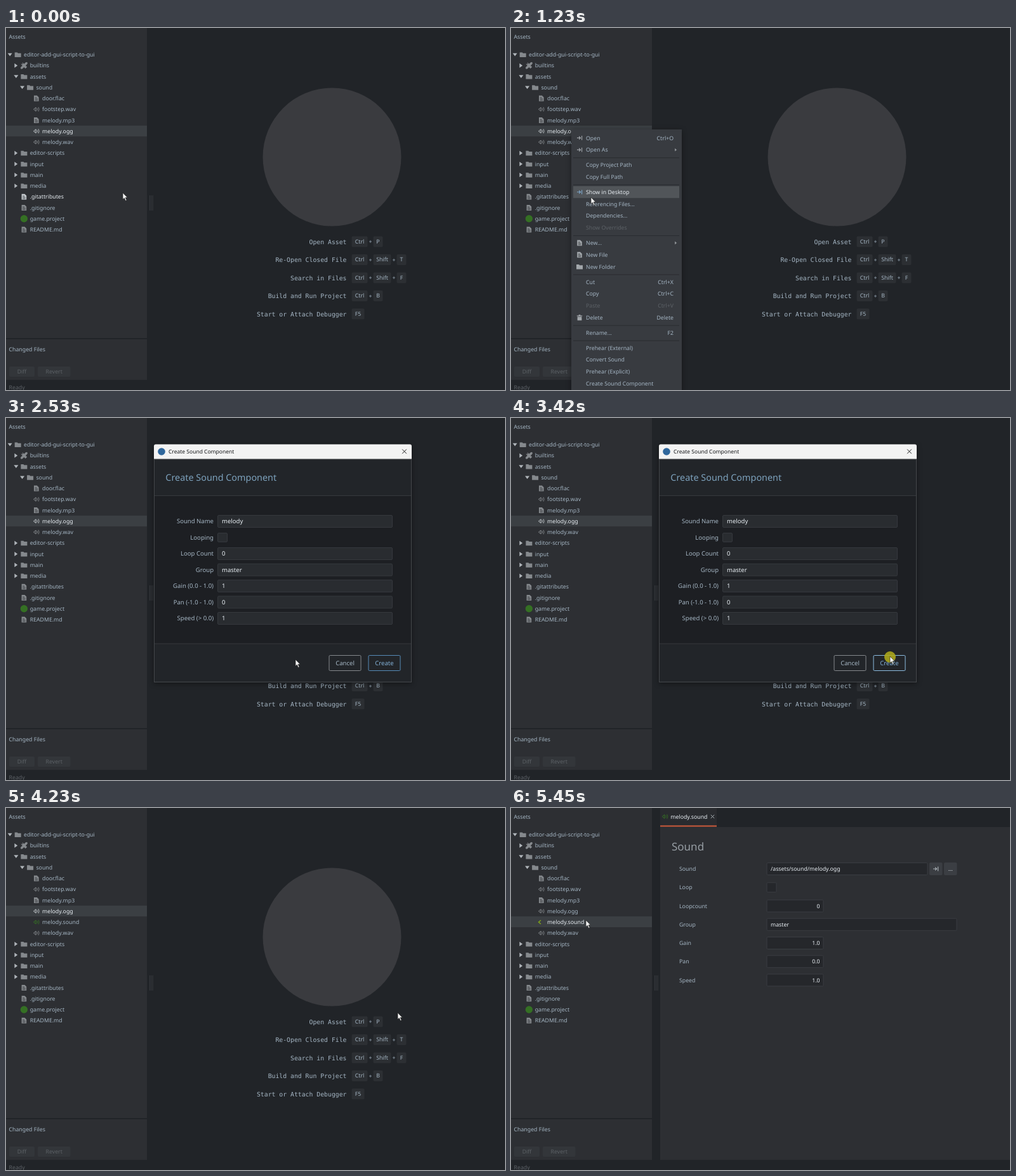
Animation of 786x571 px, one loop 6.25 s. Source, as an HTML page:

```html
<!DOCTYPE html>
<html lang="en">
<head>
<meta charset="utf-8">
<title>Create sound component</title>
<style>
  html, body { margin: 0; width: 100%; height: 100%; overflow: hidden; background: #212428; }
  svg { display: block; width: 100vw; height: 100vh; }
  text { font: 8.75px "Noto Sans", "Open Sans", sans-serif; fill: #a5b6c4; text-rendering: geometricPrecision; white-space: pre; }
  .mono { font: 9.8px "DejaVu Sans Mono", monospace; }
  .form { font-size: 9.55px; }
  .white { fill: #e9eff4; }
  .off { fill: #5c6166; }
  .end { text-anchor: end; }
  .mid { text-anchor: middle; }
  #menu, #dialog { filter: drop-shadow(0 2px 4px #0006); }
</style>
</head>
<body>
<svg id="stage" viewBox="0 0 786 571" preserveAspectRatio="none"></svg>
<script>
const LOOP = 6250, STEP = 68;
const GRAY = '#85898d', GREEN = '#357024', PANEL = '#2d2f33';

const text = (x, y, s, cls = '', style = '') =>
  `<text x="${x}" y="${y}" class="${cls}" style="${style}">${s}</text>`;
const rect = (x, y, w, h, fill, extra = '') =>
  `<rect x="${x}" y="${y}" width="${w}" height="${h}" fill="${fill}" ${extra}/>`;
const path = (d, fill, stroke = 'none', width = 1) =>
  `<path d="${d}" fill="${fill}" stroke="${stroke}" stroke-width="${width}"/>`;
const dot = (x, y, r, fill) => `<circle cx="${x}" cy="${y}" r="${r}" fill="${fill}"/>`;
const box = (x, cy, w, h, fill, stroke) =>
  rect(x + .5, cy - h / 2 + .5, w - 1, h - 1, fill, `stroke="${stroke}" rx="1.5"`);
const cross = (x, y, r, color) =>
  path(`M${x - r} ${y - r}l${2 * r} ${2 * r}m0 ${-2 * r}l${-2 * r} ${2 * r}`, 'none', color);

// Icons are drawn around their own centre.
const icons = {
  folder: c => path('M-5-3.6h4l1.2 1.4h4.8v6.2h-10z', c),
  file: c => path('M-3.8-4.6h4.8l2.8 2.8v6.4h-7.6z', c) +
    path('M-2.2-1.2h3M-2.2 .8h4.4M-2.2 2.8h4.4', 'none', PANEL, .8),
  sound: c => path('M-4.3 0l3.6-3v6z', 'none', c) +
    path('M1.2-2q1.4 2 0 4M3.2-3.4q2.2 3.4 0 6.8', 'none', c, .9),
  horn: c => path('M-.8-3L-4.2 0l3.4 3', 'none', c, 1.6),
  puzzle: c => path('M-3.5-3.5l7 7M3.5-3.5l-7 7', 'none', c, 3.8) +
    dot(-3.8, 3.8, 1.7, c) + dot(3.8, -3.8, 1.7, c) + dot(-3, -3, 1, PANEL),
  project: c => dot(0, 0, 5.7, c),
  goto: c => path('M-4 0h5.5M-.8-2.4l2.4 2.4l-2.4 2.4M3.6-3.4v6.8', 'none', c, 1.1),
  trash: c => path('M-4.2-3.2h8.4v1.2h-8.4zM-1.4-4.4h2.8v1.2h-2.8zM-3.4-1.2h6.8v5.8h-6.8z', c)
};
const icon = (name, x, y, color) => `<g transform="translate(${x} ${y})">${icons[name](color)}</g>`;

// --- Asset tree: depth, name, icon, arrow ---
const ROW = 17.25, TREE_TOP = 42 - ROW / 2;
const files = [
  [0, 'editor-add-gui-script-to-gui', 'folder', 'open'],
  [1, 'builtins', 'puzzle', 'shut'],
  [1, 'assets', 'folder', 'open'],
  [2, 'sound', 'folder', 'open'],
  [3, 'door.flac', 'file'],
  [3, 'footstep.wav', 'sound'],
  [3, 'melody.mp3', 'file'],
  [3, 'melody.ogg', 'sound'],
  [3, 'melody.sound', 'sound'],
  [3, 'melody.wav', 'sound'],
  [1, 'editor-scripts', 'folder', 'shut'],
  [1, 'input', 'folder', 'shut'],
  [1, 'main', 'folder', 'shut'],
  [1, 'media', 'folder', 'shut'],
  [1, '.gitattributes', 'file'],
  [1, '.gitignore', 'file'],
  [1, 'game.project', 'project'],
  [1, 'README.md', 'file']
];

function treeRows(hover, added, selected) {
  return files.filter(f => added || f[1] !== 'melody.sound').map(([depth, name, kind, arrow], i) => {
    const y = 42 + i * ROW, x = 18.7 + depth * 9.7, active = name === selected;
    let color = active || i === hover ? '#c3c8cc' : GRAY;
    if (kind === 'project') color = GREEN;
    if (name === 'melody.sound') {
      color = active ? '#7da01c' : GREEN;
      if (active) kind = 'horn';
    }
    const tri = arrow && path(arrow === 'open'
      ? `M${x - 16} ${y - 2.3}h7l-3.5 4.8z` : `M${x - 15} ${y - 3.5}v7l4.8-3.5z`, '#b0b5ba');
    return (active ? rect(0, Math.round(y - ROW / 2), 222, 17, '#3b3f43') : '') + (tri || '') +
      icon(kind, x, y, color) +
      text(x + 9.3, y + 3.1, name, active || i === hover ? 'white' : '');
  }).join('');
}

// --- Start screen ---
const shortcuts = [
  ['Open Asset', 'Ctrl', 'P'],
  ['Re-Open Closed File', 'Ctrl', 'Shift', 'T'],
  ['Search in Files', 'Ctrl', 'Shift', 'F'],
  ['Build and Run Project', 'Ctrl', 'B'],
  ['Start or Attach Debugger', 'F5']
];
const keyWidth = { Ctrl: 25, Shift: 28, F5: 20 };

function startScreen() {
  return dot(513.5, 203.5, 109, '#3a3b3f') + shortcuts.map(([label, ...keys], i) => {
    const y = 337 + i * 28.5;
    let x = 544.5, out = text(536.5, y + 3.6, label, 'mono end');
    keys.forEach((key, k) => {
      const w = keyWidth[key] || 15;
      if (k) out += text(x - 4.5, y + 3, '+', 'mid');
      out += rect(x, y - 8.5, w, 17, '#2c2f33', 'rx="2"') + text(x + w / 2, y + 2.9, key, 'mid');
      x += w + 9;
    });
    return out;
  }).join('');
}

// --- Context menu: label, shortcut, icon, disabled ---
const menuGroups = [
  [['Open', 'Ctrl+O', 'goto'], ['Open As', '>', 'goto']],
  [['Copy Project Path'], ['Copy Full Path']],
  [['Show in Desktop', '', 'goto'], ['Referencing Files...'], ['Dependencies...'], ['Show Overrides', '', '', true]],
  [['New...', '>', 'file'], ['New File', '', 'file'], ['New Folder', '', 'folder']],
  [['Cut', 'Ctrl+X'], ['Copy', 'Ctrl+C'], ['Paste', 'Ctrl+V', '', true], ['Delete', 'Delete', 'trash']],
  [['Rename...', 'F2']],
  [['Prehear (External)'], ['Convert Sound'], ['Prehear (Explicit)'], ['Create Sound Component']]
];
const ITEM = 18.75;
const menuItems = [], menuLines = [];
let nextY = 173.4;
for (const group of menuGroups) {
  for (const [label, keys, kind, off] of group) {
    menuItems.push({ y: nextY, label, keys, kind, off });
    nextY += ITEM;
  }
  menuLines.push(nextY - 6.7);
  nextY += 5.2;
}
menuLines.pop();

function menuRows(hover) {
  return rect(95, 160, 174, 420, '#383b40') +
    menuLines.map(y => rect(98, y, 167, 1, '#2a2c30')).join('') +
    menuItems.map(({ y, label, keys, kind, off }, i) => {
      const lit = i === hover && !off, cls = off ? 'off' : lit ? 'white' : '';
      return (lit ? rect(98, y - ITEM / 2, 167, ITEM, '#515559') : '') +
        (kind ? icon(kind, 108, y, lit ? '#7fa9cc' : '#a2a7ab') : '') +
        text(118, y + 3.1, label, cls) +
        (keys === '>' ? path(`M258 ${y - 2.4}v4.8l3.2-2.4z`, '#8d9195')
          : keys ? text(256, y + 3.1, keys, cls + ' end') : '');
    }).join('');
}

// --- Dialog ---
const formFields = [['Sound Name', 'melody'], ['Looping'], ['Loop Count', '0'], ['Group', 'master'],
  ['Gain (0.0 - 1.0)', '1'], ['Pan (-1.0 - 1.0)', '0'], ['Speed (&gt; 0.0)', '1']];

function dialog() {
  return rect(233, 41.5, 406, 375.5, '#222529', 'rx="3"') +
    path('M233 65v-20.5q0-3 3-3h400q3 0 3 3v20.5z', '#f3f3f3') +
    dot(245, 53, 5.8, '#2f679c') +
    text(256, 56.2, 'Create Sound Component', '', 'font-size:8.5px;fill:#16181a') +
    cross(627.5, 52.8, 3.4, '#222') +
    text(251.3, 99, 'Create Sound Component', '', 'font-size:14.4px;fill:#7da2bd') +
    rect(233, 123, 406, 233, '#1d1f23') +
    rect(233, 122, 406, 1, '#36393d') + rect(233, 355.5, 406, 1, '#36393d') +
    formFields.map(([label, value], i) => {
      const y = 163 + i * 25.5;
      return text(327, y + 3.4, label, 'form end') +
        (value ? box(333, y, 276, 20, '#292c30', '#35383d') + text(340, y + 3.4, value, 'form white')
          : box(333, y, 16, 15, '#292c30', '#35383d'));
    }).join('') +
    box(508.5, 386.5, 51, 25, '#222529', '#85898d') + text(534, 390, 'Cancel', 'form mid') +
    `<g id="create">${box(570.5, 386.5, 51, 25, '#222529', '#568bb8')}</g>` +
    text(596, 390, 'Create', 'form mid', 'fill:#82b0d6') +
    rect(233.5, 65, 405, 351.5, 'none', 'stroke="#44474b"');
}

// --- Sound editor: label, value, width ---
const properties = [['Sound', '/assets/sound/melody.ogg', 254], ['Loop', '', 16], ['Loopcount', '0', 90],
  ['Group', 'master', 300], ['Gain', '1.0', 90], ['Pan', '0.0', 90], ['Speed', '1.0', 90]];

function editor() {
  return rect(235, 0, 551, 555, '#212428') + rect(235, 30, 551, 525, PANEL) +
    rect(235, 0, 89, 28, '#292b2f') + rect(235, 27.5, 89, 2, '#cf5c3d') +
    icon('sound', 242.5, 13.5, GREEN) + text(251.3, 16.8, 'melody.sound', 'white') +
    cross(317.5, 13.5, 2.7, '#a9b0b6') +
    text(253, 66.5, 'Sound', '', 'font-size:17px;fill:#969da3') +
    properties.map(([label, value, w], i) => {
      const y = 96 + i * 29.25, num = w === 90;
      return text(265, y + 3.1, label) + box(402.5, y, w, w === 16 ? 16 : 20, '#25272b', '#3a3d42') +
        text(num ? 486.5 : 409, y + 3.1, value, num ? 'white end' : 'white');
    }).join('') +
    rect(659, 86, 20.5, 20, '#3b3e43', 'rx="2"') + icon('goto', 669, 96, '#aeb5ba') +
    rect(682, 86, 20.5, 20, '#3b3e43', 'rx="2"') + text(692.3, 98.5, '...', 'mid white');
}

const grip = [226, 228.3, 230.6].map(x => rect(x, 264, 1, 24, '#383b3f')).join('');
const stage = document.getElementById('stage');
stage.innerHTML = rect(0, 0, 786, 571, '#212428') + rect(0, 0, 222, 555, PANEL) +
  rect(0, 489, 222, 2, '#212428') + text(4.5, 17.2, 'Assets') + text(4.5, 509.5, 'Changed Files') +
  rect(5, 534, 40, 16, '#33363a', 'rx="2"') + text(25, 545.4, 'Diff', 'off mid') +
  rect(50, 534, 51.5, 16, '#33363a', 'rx="2"') + text(75.7, 545.4, 'Revert', 'off mid') +
  text(4.5, 569.6, 'Ready', 'off') + grip +
  `<g id="tree"></g><g id="start">${startScreen()}</g><g id="editor">${editor()}</g>
   <g id="dialog">${dialog()}</g><g id="menu"></g>
   <g id="cursor"><circle id="click" cy="1" r="9" fill="#aeaa1a" opacity=".88"/>
   ${path('M0 0v10.3l2.4-2.1l1.9 4.3l1.7-.8l-1.9-4.1h3.2z', '#f4f4f4', '#1c1c1c', .6)}</g>`;

const el = id => document.getElementById(id);
const show = (id, on) => { el(id).style.display = on ? '' : 'none'; };
const within = (n, a, b) => n >= a && n < b;

// Pointer keys: step, x, y
const track = [
  [0, 184, 260], [1, 182, 257], [3, 165, 235], [6, 122, 187], [8, 98, 163], [9, 94, 160],
  [16, 94, 160], [17, 106, 206], [18, 126, 267], [19, 141, 335], [20, 158, 427],
  [23, 172, 520], [26, 177, 553], [29, 176, 556],
  [34, 176, 556], [35, 235, 517], [36, 350, 437], [37, 456, 381], [38, 505, 378], [40, 538, 379],
  [41, 556, 378], [45, 597, 376],
  [60, 597, 376], [62, 617, 323], [63, 617, 323], [64, 628, 250], [65, 560, 186], [66, 420, 147],
  [67, 290, 139], [68, 190, 150], [70, 118, 177], [92, 118, 177]
];
const clicks = [[10, 13], [32, 34], [50, 52], [71, 73], [74, 76]];

function pointer(step) {
  const i = track.findIndex(k => k[0] > step);
  const [s0, x0, y0] = track[i - 1], [s1, x1, y1] = track[i];
  const p = (step - s0) / (s1 - s0);
  return [x0 + (x1 - x0) * p, y0 + (y1 - y0) * p];
}

const drawn = {};
function redraw(id, key, make) {
  if (drawn[id] === key) return;
  drawn[id] = key;
  el(id).innerHTML = make();
}

function frame(now) {
  const step = Math.floor(now % LOOP / STEP), [x, y] = pointer(step);
  const menuOpen = within(step, 12, 34), dialogOpen = within(step, 35, 53);
  const added = step >= 54, selected = step >= 71 ? 'melody.sound' : 'melody.ogg', edited = step >= 77;

  const hover = x < 222 && !menuOpen && !dialogOpen ? Math.floor((y - TREE_TOP) / ROW) : -1;
  redraw('tree', [hover, added, selected].join(), () => treeRows(hover, added, selected));

  const lit = x > 98 ? menuItems.findIndex(m => Math.abs(m.y - y) < ITEM / 2) : -1;
  if (menuOpen) redraw('menu', lit, () => menuRows(lit));

  show('menu', menuOpen);
  show('dialog', dialogOpen);
  show('start', !edited);
  show('editor', edited);
  show('click', clicks.some(([a, b]) => within(step, a, b)));
  el('create').firstElementChild.setAttribute('stroke', x > 571 ? '#8dbde2' : '#568bb8');
  el('cursor').setAttribute('transform', `translate(${x.toFixed(2)} ${y.toFixed(2)})`);
}

const begin = performance.now();
(function tick() {
  frame(performance.now() - begin);
  requestAnimationFrame(tick);
})();
</script>
</body>
</html>
```
